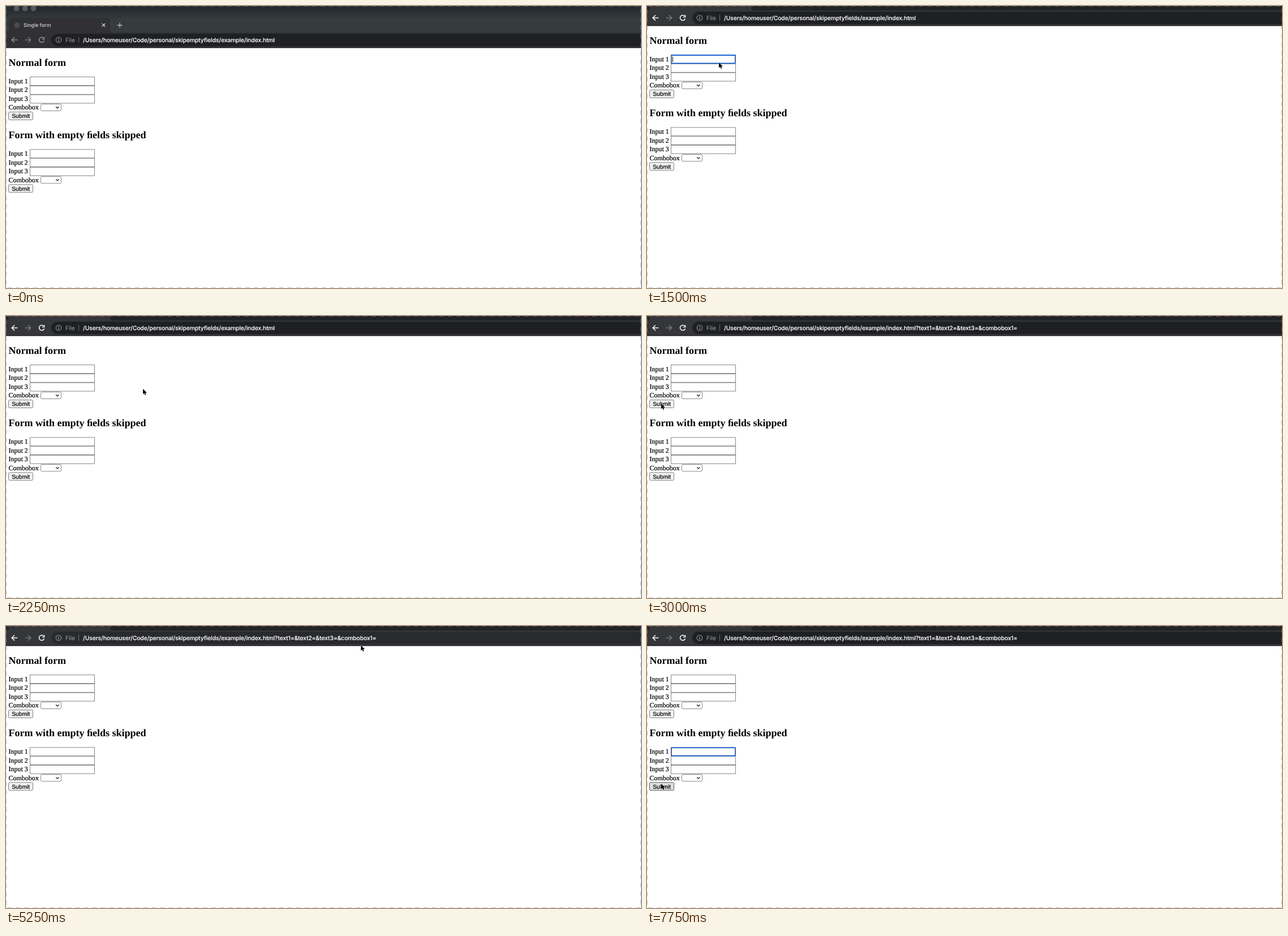
An HTML page for the animation above (8000 ms loop, 1122x499 px).

```html
<!DOCTYPE html>
<html lang="en">
<head>
<meta charset="utf-8">
<title>Single form</title>
<style>
  html, body { margin: 0; width: 100%; height: 100%; overflow: hidden; background: #fff; }
  svg { display: block; width: 1122px; height: 499px; }
  text { white-space: pre; text-rendering: geometricPrecision; }
  .ui { font: 500 10.3px Inter, Roboto, sans-serif; letter-spacing: -.095px; fill: #fff; }
  #url { stroke: #fff; stroke-width: .15; }
  .tab { font: 500 8.9px Inter, Roboto, sans-serif; fill: #d4d6d8; }
  .dim { fill: #9aa0a6; font-weight: 400; letter-spacing: 0; }
  .label, .btn { stroke: #000; stroke-width: .22; }
  .label { font: 12px "Liberation Serif", Times, serif; }
  .title { font: bold 18px "Liberation Serif", Times, serif; }
  .btn { font: 10.2px "Liberation Sans", Arial, sans-serif; }
  .box { fill: #fff; stroke: #6a6a6a; stroke-width: .8; }
  .button { fill: #efefef; stroke: #767676; stroke-width: .9; }
  .button.down { fill: #dedede; stroke: #484848; }
  .ring { fill: none; stroke: #1a62d2; stroke-width: 1.8; }
  .line { fill: none; stroke: #8d9196; stroke-width: 1.5; }
  .active .live { stroke: #fff; }
  .idle { stroke: #75787c; }
  .bar { fill: #313135; }
  .strip { fill: url(#shade); }
  .active .bar { fill: #35363a; }
  .active .strip { fill: #222327; }
  .pill { fill: #1f2023; }
  .hover .pill { fill: #292a2e; }
  .edge { fill: none; stroke: #888; stroke-opacity: .55; stroke-dasharray: 8 7; }
</style>
</head>
<body>
<svg id="stage" viewBox="0 0 1122 499">
  <defs>
    <linearGradient id="shade" x1="0" y1="0" x2="0" y2="1">
      <stop offset=".15" stop-color="#262c30"/>
      <stop offset=".5" stop-color="#363b3e"/>
    </linearGradient>
  </defs>
  <rect width="1122" height="499" fill="#fff"/>
  <g id="scene">
    <g id="chrome">
      <rect class="strip" y="-39" width="1122" height="47"/>
      <g fill="#55595c">
        <circle cx="18.5" cy="-34.5" r="4.8"/>
        <circle cx="33.5" cy="-34.5" r="4.8"/>
        <circle cx="48.5" cy="-34.5" r="4.8"/>
      </g>
      <path class="bar" d="M0 8Q5 8 5 3V-12Q5 -18 11 -18H178Q184 -18 184 -12V2Q184 8 190 8H1122V35H0Z"/>
      <circle cx="19.5" cy="-5" r="5" fill="#4a4c4f"/>
      <text class="tab" x="31" y="-2">Single form</text>
      <path d="M169.7 -8l5.6 5.6m0 -5.6l-5.6 5.6" stroke="#d6d8da" stroke-width="1.2"/>
      <path d="M196.5 -5h9m-4.5 -4.5v9" stroke="#b5b8ba" stroke-width="1.3"/>
      <path class="pill" d="M1122 10H91a11 11 0 0 0 0 22H1122Z"/>
      <rect y="34" width="1122" height="1.4" fill="#1c181c"/>
      <path class="line live" d="M20.3 21H10.5M15 16.2L10.2 21L15 25.8"/>
      <path class="line idle" d="M33.8 21H43.6M39 16.2L43.8 21L39 25.8"/>
      <path class="line live" d="M66.4 17.6A4.6 4.6 0 1 0 67.5 22.2M67.6 16V19.6H64"/>
      <circle class="line" cx="93" cy="21" r="4.8" style="stroke-width:1.1"/>
      <path d="M93 20.2v3.6M93 18v1.2" stroke="#a8acb0" stroke-width="1.2"/>
      <text class="ui dim" x="105" y="24.8">File</text>
      <path d="M128.5 15.5v11" stroke="#6a6d71"/>
      <text class="ui" id="url" x="136" y="24.8"></text>
    </g>
    <g id="forms"></g>
  </g>
  <rect class="edge" x=".5" y=".5" width="1121" height="498"/>
  <path id="pointer" d="M0 0V9.6L2.2 7.6L3.7 11L5.4 10.3L4 7H7Z" stroke="#fff" stroke-width=".8" paint-order="stroke"/>
</svg>
<script>
const STEP = 250, LOOP = 8000;
const PAGE = "/Users/homeuser/Code/personal/skipemptyfields/example/index.html";
const QUERY = "?text1=&text2=&text3=&combobox1=";
const $ = id => document.getElementById(id);

// Pointer tip per step, starting at 250 ms.
const TRACK = [
  [846, 380], [715, 310], [430, 190], [190, 112], [132, 99],
  [127, 100], [205, 190], [305, 267], [242, 129], [40, 150],
  [25, 155], [25, 155], [52, 169], [150, 105], [340, 55],
  [489, 31], [570, 34], [640, 36], [575, 34], [600, 35],
  [627, 34], [520, 80], [330, 150], [165, 205], [125, 219],
  [420, 60], [626, 4], [330, 120], [10, 266], [146, 231], [25, 279]
];

const inputs = [0, 1, 2].map(i => `
  <text class="label" x="4.5" y="${97.7 + i * 15.7}">Input ${i + 1}</text>
  <rect class="box" x="42.5" y="${86.6 + i * 15.7}" width="114" height="15"/>`).join("");

const form = (id, title, y) => `
  <g id="${id}" transform="translate(0 ${y})">
    <text class="title" x="4.5" y="67">${title}</text>${inputs}
    <text class="label" x="4.5" y="144.3">Combobox</text>
    <rect class="box" x="61.5" y="134.5" width="36" height="12" rx="2"/>
    <path d="M88.3 139.3l2.6 2.6l2.6 -2.6" fill="none" stroke="#111" stroke-width="1.3"/>
    <rect class="button" x="4.5" y="148.5" width="43" height="14" rx="2"/>
    <text class="btn" x="10.3" y="159.3">Submit</text>
    <g class="focus">
      <rect class="ring" x="43" y="87" width="113" height="14.3" rx="1.5"/>
      <path class="caret" d="M45.5 89.5v9.5" stroke="#111"/>
    </g>
  </g>`;

// The heading is set with the fi ligature.
$("forms").innerHTML = form("plain", "Normal form", 0) +
  form("skipped", "Form with empty \uFB01elds skipped", 128.3);

function setForm(id, focus, caret, down) {
  const g = $(id), show = (cls, on) =>
    g.querySelector(cls).setAttribute("visibility", on ? "inherit" : "hidden");
  show(".focus", focus);
  show(".caret", focus && caret);
  g.querySelector(".button").classList.toggle("down", down);
}

function draw(ms) {
  const t = Math.floor(ms % LOOP / STEP) * STEP;
  const within = (a, b) => t >= a && t < b;
  const tip = TRACK[t / STEP - 1];

  $("scene").setAttribute("transform", `translate(0 ${t < 250 ? 39 : 0})`);
  $("chrome").classList.toggle("active", t >= 1000);
  $("chrome").classList.toggle("hover", within(4000, 5500));
  $("url").textContent = PAGE + (t >= 3000 ? QUERY : "");
  setForm("plain", within(1250, 1750), t === 1500, t === 2750);
  setForm("skipped", t >= 6250, within(6250, 6750) || within(7250, 7750), t >= 7750);

  $("pointer").setAttribute("visibility", tip ? "visible" : "hidden");
  if (tip) $("pointer").setAttribute("transform", `translate(${tip})`);
}

const start = performance.now();
(function tick() {
  draw(performance.now() - start);
  requestAnimationFrame(tick);
})();
</script>
</body>
</html>
```
